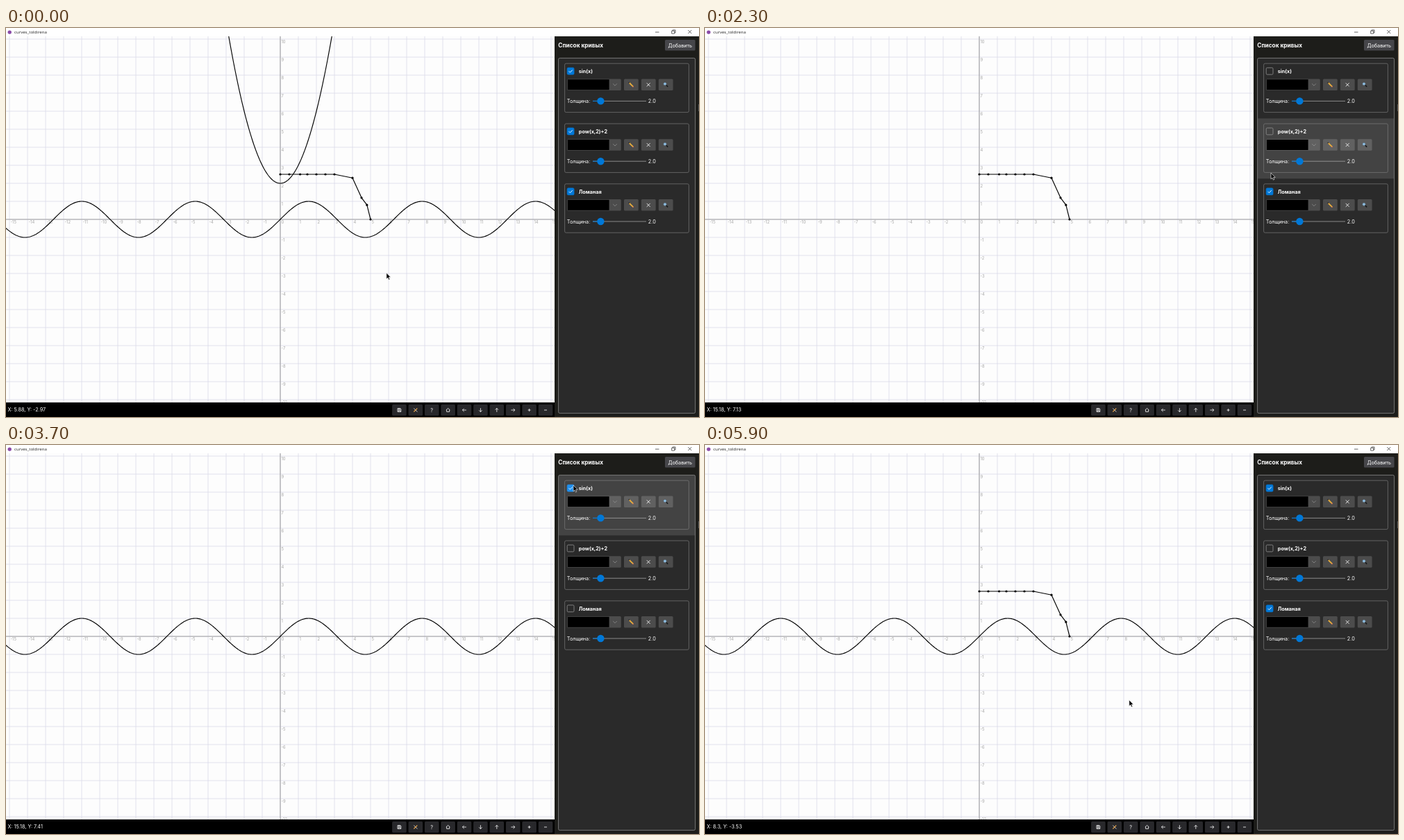
An HTML page for the animation above (6000 ms loop, 998 by 561 pixels).

```html
<!DOCTYPE html>
<html lang="ru">
<head>
<meta charset="utf-8">
<title>Список кривых</title>
<style>
html, body { margin: 0; width: 100%; height: 100%; overflow: hidden; background: #000; }
svg { display: block; width: 998px; height: 561px; font: 7.28px Inter, "Open Sans", sans-serif; }
text { fill: #fff; white-space: pre; }
.line { fill: none; stroke: #fff; stroke-width: .8; }
.curve { fill: none; stroke: #000; stroke-width: 1.15; stroke-linejoin: round; }
.label { font-size: 5.8px; fill: #a6a6a6; }
.bold { font-weight: 700; }
.btn { fill: #fff; fill-opacity: .16; }
</style>
</head>
<body>
<svg id="stage" viewBox="0 0 998 561"></svg>
<script>
const LOOP = 6000, STEP = 100, OX = 395, OY = 276, UNIT = 26, EDGE = 790;
const stage = document.getElementById('stage');

function add(parent, tag, attrs, text) {
  const el = document.createElementNS('http://www.w3.org/2000/svg', tag);
  for (const k in attrs) el.setAttribute(k, attrs[k]);
  if (text !== undefined) el.textContent = text;
  parent.appendChild(el);
  return el;
}
const rect = (p, x, y, width, height, attrs) => add(p, 'rect', { x, y, width, height, ...attrs });
const path = (p, d, attrs) => add(p, 'path', { d, class: 'line', ...attrs });
const label = (p, x, y, text, attrs) => add(p, 'text', { x, y, ...attrs }, text);
const circle = (p, cx, cy, r, fill) => add(p, 'circle', { cx, cy, r, fill });
const px = x => OX + x * UNIT;
const py = y => OY - y * UNIT;

// Plot
const clip = add(add(stage, 'defs'), 'clipPath', { id: 'plot' });
rect(clip, 0, 12, EDGE, 528);
const plot = add(stage, 'g', { 'clip-path': 'url(#plot)' });
rect(plot, 0, 12, EDGE, 528, { fill: '#fdfdfd' });
let grid = '';
for (let i = -15; i <= 15; i++) {
  grid += `M${px(i)} 12V540`;
  if (Math.abs(i) <= 10) grid += `M0 ${py(i)}H790`;
}
path(plot, grid, { style: 'stroke:#dadae9' });
path(plot, `M${OX} 12V540M0 ${OY}H790`, { style: 'stroke:#a0a0a0;stroke-width:1.1' });
for (let i = -15; i <= 15; i++) {
  label(plot, px(i) + 1.4, OY + 6.4, i, { class: 'label' });
  if (i && Math.abs(i) <= 10) label(plot, OX + 1.4, py(i) + 6.4, i, { class: 'label' });
}

function trace(f, from, to) {
  let d = '';
  for (let x = from; x <= to; x += .05) d += (d ? 'L' : 'M') + px(x).toFixed(2) + ' ' + py(f(x)).toFixed(2);
  return d;
}
const knots = [[0, 2.5], [.5, 2.5], [1.1, 2.5], [1.5, 2.5], [2, 2.5], [2.5, 2.5], [3, 2.5],
  [4, 2.3], [4.5, 1.2], [4.8, .8], [5, 0]];
const broken = add(plot, 'g');
path(broken, 'M' + knots.map(([x, y]) => px(x) + ' ' + py(y)).join('L'), { class: 'curve' });
knots.forEach(([x, y]) => circle(broken, px(x), py(y), 1.6, '#000'));
const curves = [
  path(plot, trace(Math.sin, -15.3, 15.3), { class: 'curve' }),
  path(plot, trace(x => x * x + 2, -3, 3.01), { class: 'curve' }),
  broken
];

// Title bar
rect(stage, 0, 0, 998, 12, { fill: '#fff' });
circle(stage, 5.2, 6.1, 2.7, '#8a4aa8');
label(stage, 12, 8.3, 'curves_toldirena', { style: 'font:6.1px "Open Sans",sans-serif;fill:#222' });
path(stage, 'M935 6H940.5M958.7 4.2H962.7V8H958.7ZM960 4V2.9H964V6.8H963M982.3 3L987.3 8M987.3 3L982.3 8',
  { style: 'stroke:#222;stroke-width:.7' });

// Status bar
rect(stage, 0, 540, EDGE, 21, { fill: '#000' });
const status = label(stage, 2.4, 553.2, '');
const icons = [
  'M-2.4 -2.4H1.6L2.4 -1.6V2.4H-2.4ZM-1.2 -2.2V-.8H1V-2.2M-1.3 2.3V.7H1.3V2.3',
  'M-2.5 -2.5L2.5 2.5',
  '',
  'M-2.8 0L0 -2.6L2.8 0M-2 -.6V2.4H2V-.6',
  'M2.8 0H-2.6M-.4 -2.2L-2.6 0L-.4 2.2',
  'M0 -2.8V2.6M-2.2 .4L0 2.6L2.2 .4',
  'M0 2.8V-2.6M-2.2 -.4L0 -2.6L2.2 -.4',
  'M-2.8 0H2.6M.4 -2.2L2.6 0L.4 2.2',
  'M-2 0H2M0 -2V2',
  'M-2 0H2'
];
icons.forEach((d, i) => {
  const g = add(stage, 'g', { transform: `translate(${566.4 + i * 23.4} 551)` });
  rect(g, -10.3, -8, 20.6, 16, { rx: 1.5, fill: '#28282b' });
  path(g, d);
  if (i === 1) path(g, 'M2.5 -2.5L-2.5 2.5', { style: 'stroke:#e0a04a;stroke-width:1.1' });
  if (i === 2) label(g, 0, 2.7, '?', { 'text-anchor': 'middle' });
});

// Side panel
rect(stage, EDGE, 12, 208, 549, { fill: '#1d1d1a' });
rect(stage, 997, 110, 1, 10, { fill: '#555' });
label(stage, 795.3, 28.2, 'Список кривых', { class: 'bold', style: 'font-size:8.32px' });
rect(stage, 949, 17, 43.6, 15.6, { rx: 1.5, fill: '#46464a' });
label(stage, 970.8, 27.5, 'Добавить', { 'text-anchor': 'middle' });
rect(stage, 795.6, 43.4, 197, 512.2, { rx: 2, fill: '#2a2a2a' });

const ROW = 86.8;
const rows = ['sin(x)', 'pow(x,2)+2', 'Ломаная'].map((name, i) => {
  const g = add(stage, 'g', { transform: `translate(0 ${i * ROW})` });
  const hover = rect(g, 796, 43.6, 196.2, ROW, { fill: '#434343' });
  rect(g, 804.6, 51.2, 178.8, 70.4, { rx: 2, class: 'line', style: 'stroke:#7b7b7b;stroke-width:.7' });
  const box = rect(g, 808.2, 57.3, 9.8, 9.8, { rx: 1.5, 'stroke-width': .8 });
  const tick = path(g, 'M810.6 62.3L812.4 64.1L815.8 60.5', { style: 'stroke-width:.9' });
  label(g, 824.8, 65.4, name, { class: 'bold' });

  rect(g, 808, 73.4, 77.8, 16.6, { rx: 1.5, class: 'btn' });
  rect(g, 808.8, 74.2, 59.8, 15, { fill: '#000' });
  path(g, 'M874.2 80.4L877 83.2L879.8 80.4', { style: 'stroke:#999;stroke-width:.7' });
  [890, 914.9, 939.8].forEach(x => rect(g, x, 73.4, 20.8, 16.6, { rx: 1.5, class: 'btn' }));
  path(g, 'M897.6 79L903.2 84.6', { style: 'stroke:#e9ae3c;stroke-width:1.8' });
  path(g, 'M896.9 78.3L897.8 79.2', { style: 'stroke:#222;stroke-width:1.5' });
  path(g, 'M902.8 84.2L903.6 85', { style: 'stroke:#c66a60;stroke-width:1.8' });
  path(g, 'M922.7 79.3L927.7 84.3M927.7 79.3L922.7 84.3');
  path(g, 'M950.6 82.2L953.2 84.8', { style: 'stroke:#16181a;stroke-width:1.5' });
  add(g, 'circle', { cx: 949, cy: 80.6, r: 2.2, fill: '#8fc0e4', stroke: '#555d66', 'stroke-width': .7 });

  label(g, 807.8, 108.1, 'Толщина:');
  path(g, 'M845 105.4H922', { style: 'stroke:#a2a2a2' });
  path(g, 'M845 105.4H856', { style: 'stroke:#0078d7;stroke-width:1' });
  circle(g, 856.4, 105.4, 5.2, '#0078d7');
  label(g, 924.8, 108.1, '2.0');
  return { hover, box, tick };
});
rect(stage, 795.6, 43.4, 197, 512.2, { rx: 2, class: 'line', style: 'stroke:#8c8c8c;stroke-width:.8' });

const pointer = path(stage, 'M0 0V8.8L2 7L3.4 10.1L4.9 9.4L3.5 6.4H6.2Z',
  { style: 'fill:#000;stroke:#fff;stroke-width:.6' });

// Pointer route: time, x, y
const route = [
  [0, 547.88, 353.22], [900, 789.68, 90.62], [1000, 803, 80], [1200, 814, 63], [1400, 814, 63],
  [1800, 814, 150], [2000, 814, 150], [2300, 815, 209], [2600, 814, 237], [2800, 812, 233],
  [3000, 787.6, 88.54], [3100, 793, 78], [3300, 789.68, 83.34], [3400, 798, 75], [3600, 815, 60],
  [3700, 817, 58], [3900, 814, 66], [4400, 789.68, 215.94], [4600, 802, 229], [4800, 813, 236],
  [5000, 813, 236], [5600, 610.8, 367.78], [LOOP, 610.8, 367.78]
];
// Times at which each checkbox is toggled
const clicks = [[1300, 3600], [1900], [2700, 4900]];

function pointerAt(t) {
  const i = route.findIndex(p => p[0] > t);
  const [t0, x0, y0] = route[i - 1], [t1, x1, y1] = route[i];
  const k = (t - t0) / (t1 - t0);
  return [x0 + (x1 - x0) * k, y0 + (y1 - y0) * k];
}

// Coordinates stay at the last place visited on the plot
function lastOnPlot(t) {
  let p = pointerAt(t);
  while (p[0] >= EDGE) p = pointerAt(t -= STEP);
  return p;
}

const show = (el, on) => el.setAttribute('visibility', on ? 'visible' : 'hidden');
const round = v => +v.toFixed(2);

function draw(t) {
  const [x, y] = pointerAt(t), [sx, sy] = lastOnPlot(t);
  pointer.setAttribute('transform', `translate(${x} ${y})`);
  status.textContent = `X: ${round((sx - OX) / UNIT)}, Y: ${round((OY - sy) / UNIT)}`;
  rows.forEach((row, i) => {
    const on = clicks[i].filter(c => c <= t).length % 2 === 0;
    const ry = y - i * ROW;
    const overBox = x > 808 && x < 818 && ry > 57 && ry < 67;
    show(curves[i], on);
    show(row.tick, on);
    show(row.hover, x > 796 && x < 992 && ry >= 43.6 && ry < 43.6 + ROW);
    const blue = overBox ? '#2090ee' : '#0078d7';
    row.box.setAttribute('fill', on ? blue : 'none');
    row.box.setAttribute('stroke', on ? blue : overBox ? '#ccc' : '#929292');
  });
}

let last = -1;
function tick() {
  const t = Math.floor(performance.now() % LOOP / STEP) * STEP;
  if (t !== last) draw(last = t);
  requestAnimationFrame(tick);
}
tick();
</script>
</body>
</html>
```
